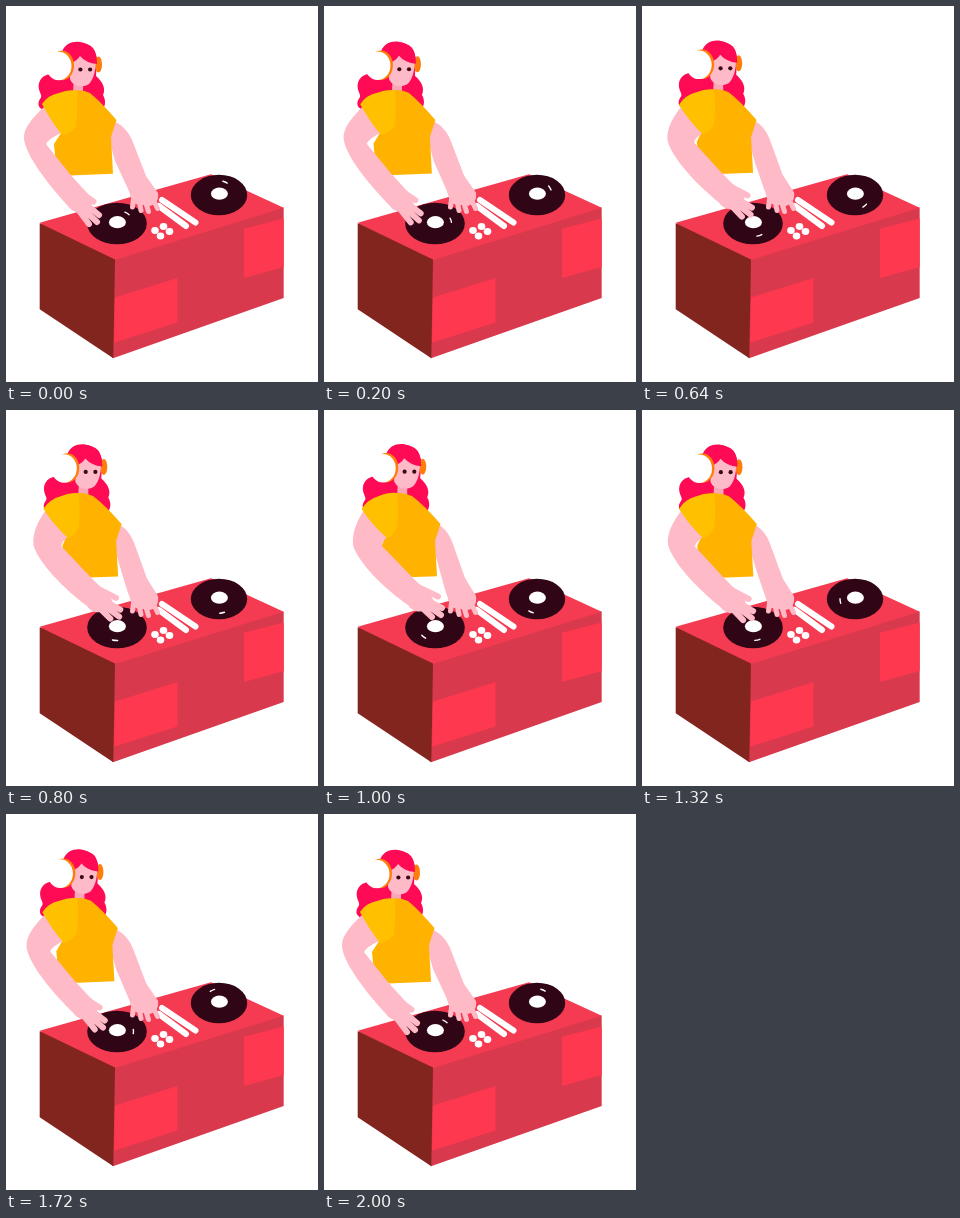
Recreate the animation shown at these times as an HTML page with a canvas. Size 312 by 376 pixels, loop 2040 ms.

```html
<!DOCTYPE html>
<html lang="en">
<head>
<meta charset="utf-8">
<title>DJ</title>
<style>
html, body { margin: 0; width: 100%; height: 100%; overflow: hidden; background: #fff; }
canvas { display: block; width: 312px; height: 376px; }
</style>
</head>
<body>
<canvas id="stage" width="312" height="376"></canvas>
<script>
const ctx = document.getElementById('stage').getContext('2d');
const STEP = 40, LOOP = 2040, SWING = 2000, TAU = Math.PI * 2;
const SKIN = '#ffbac8', HAIR = '#ff0a54', ORANGE = '#ff7d0a', VINYL = '#300617';

let sway = 0;

function fill(color, d) {
  ctx.fillStyle = color;
  ctx.fill(new Path2D(d));
}

function oval(color, x, y, rx, ry = rx) {
  ctx.fillStyle = color;
  ctx.beginPath();
  ctx.ellipse(x, y, rx, ry, 0, 0, TAU);
  ctx.fill();
}

function stroke(color, width, d) {
  ctx.strokeStyle = color;
  ctx.lineWidth = width;
  ctx.lineCap = ctx.lineJoin = 'round';
  ctx.stroke(new Path2D(d));
}

// Blends two paths of the same structure by the current sway.
function blend(back, front) {
  const to = front.match(/-?[\d.]+/g);
  let i = 0;
  return back.replace(/-?[\d.]+/g, n => +n + (to[i++] - n) * sway);
}

function booth() {
  fill('#d9394d', 'M34 217.5 L277.7 201.5 V292 L107 352.3 L60 300 Z');
  fill('#f53b51', 'M33.7 216.8 L205 168.2 L277.7 201.7 L109 254 Z');
  fill('#83251f', 'M33.7 217.3 L109 253.5 L107.3 352.3 L33.7 303.3 Z');
  fill('#fd384f', 'M109 291.5 L171.5 272 V316.5 L108 336.7 Z');
  fill('#fd384f', 'M238 222.7 L277.7 212.5 V261 L238 272 Z');
  stroke('#fff', 6, 'M156 194 L189.5 216.5 M153 200 L180 220');
  [[149, 224.5], [157.5, 220.5], [154.5, 230], [163.5, 225.5]]
    .forEach(([x, y]) => oval('#fff', x, y, 3.8, 3.4));
}

function record(x, y, rx, ry, gx, gy, deg) {
  oval(VINYL, x, y, rx, ry);
  oval('#fff', x + 0.4, y - 1.3, 8.5, 6.1);
  const a = deg * Math.PI / 180;
  ctx.strokeStyle = '#fff';
  ctx.lineWidth = 1.4;
  ctx.lineCap = 'round';
  ctx.beginPath();
  ctx.ellipse(x, y, gx, gy, 0, a - 0.16, a + 0.16);
  ctx.stroke();
}

function inHead(draw) {
  ctx.save();
  ctx.translate(6.2 * sway, -1.8 * sway);
  draw();
  ctx.restore();
}

function hair() {
  fill(HAIR, 'M56 46 C59 37 67 35 74 36 C84 38 90 44 91 54 L90 70 C97 76 100 83 97 89 ' +
    'C101 96 99 103 93 106 L42 104 C34 105 30 99 34 93 C38 89 31 86 33 77 C36 68 44 68 52 66 Z');
}

function face() {
  fill('#f9a6b7', 'M68 70 L77 76 V86 Q72 88 67 86 Z');
  oval(ORANGE, 92.5, 58.5, 3.5, 8);
  fill(SKIN, 'M64 52 L74 46 L89 52 C91 61 88 73 83 78 C77 82 67 81 64 73 Z');
  fill(HAIR, 'M58 44 C66 34 80 35 87 42 Q91 47 91 58 Q80 57 74 50 Q71 55 65 57 L60 52 Z');
  oval(ORANGE, 56, 59.5, 12, 14.7);
  oval('#fff', 52.7, 60, 12.8, 14.3);
  oval('#3a0a18', 74.4, 63.5, 2.1);
  oval('#3a0a18', 84.1, 63.5, 2.1);
}

function rightArm() {
  fill(SKIN, blend(
    'M104 114 C116 117 124 127 128 139 L140 170 L152 187 C153 194 150 198 144 200 L130 198 C124 195 125 189 122 183 L109 155 C106 146 105 137 102 130 Z',
    'M108 113 C119 114 126 124 130 137 L141 168 L152 186 C153 194 150 198 144 200 L130 198 C124 195 125 189 122 183 L115 158 C112 147 110 138 106 130 Z'));
  stroke(SKIN, 5, 'M128 189 L126.5 201 M133 194 L135 204.5 M139 194 L142.5 205.5 M146 191 L151.5 202.5');
}

function torso() {
  fill('#ffb200', blend(
    'M62 86 Q74 82 84 87 Q94 95 110.5 114 L105 131 L107 167.7 L51 170 L48 138 L57 124 Z',
    'M66 84 Q78 81 88 86 Q100 95 116.5 114 L111 131 L113 166.2 L61 168 L58 135 L64 120 Z'));
}

function leftArm() {
  fill(SKIN, blend(
    'M39 100 C28 111 17 121 18 133 C20 150 42 178 62 200 C71 212 86 207 87 193 C81 187 72 177 63 167 L40 138 C43 133 49 130 57 126 L52 104 Z',
    'M40 100 C33 111 28 122 29 135 C34 153 62 180 84 195 C91 206 107 202 110 191 C106 183 99 178 89 168 L58 136 C58 132 60 130 64 126 L56 104 Z'));
  stroke(SKIN, 6, blend(
    'M72 185 L87.5 195.5 M76 195 L93 209 M74 200 L91 216 M71 202 L83 218',
    'M94 177 L114 186.5 M98 188 L118 198 M97 191 L117 205 M94 194 L108 207'));
}

function leftSleeve() {
  fill('#ffc000', blend(
    'M36 98 Q42 89 53 87 Q63 83 71 85 Q72 106 70 121 Q63 128 56 129 Q45 115 36 98 Z',
    'M37.5 99 Q44 89 55 86 Q65 82 73 83 Q75 102 73 117 Q69 127 63 128 Q48 115 37.5 99 Z'));
}

function draw(t) {
  const x = t % SWING / SWING;
  const ramp = 1 - Math.abs(2 * x - 1);
  sway = (ramp + (1 - Math.cos(TAU * x)) / 2) / 2;

  ctx.fillStyle = '#fff';
  ctx.fillRect(0, 0, 312, 376);
  booth();
  record(111, 217.5, 29.8, 20.8, 16.5, 13, -52 + 186 * ramp);
  record(213, 189, 28.2, 20.3, 15, 14.2, -66 + 360 * x);
  inHead(hair);
  rightArm();
  inHead(face);
  torso();
  leftArm();
  leftSleeve();
}

let start = null;
function tick(now) {
  if (start === null) start = now;
  draw(Math.floor((now - start) % LOOP / STEP) * STEP);
  requestAnimationFrame(tick);
}
draw(0);
requestAnimationFrame(tick);
</script>
</body>
</html>
```
